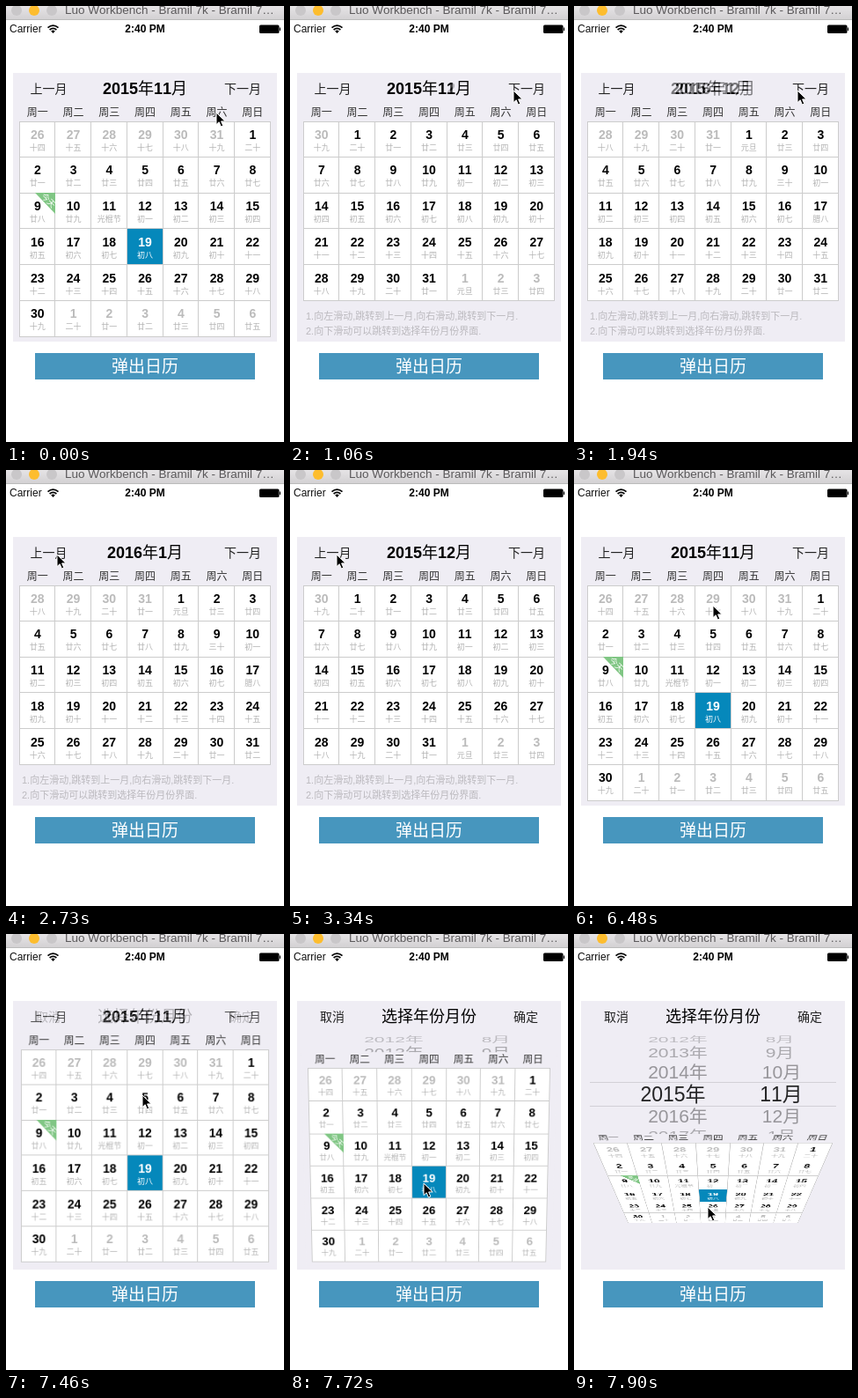
Recreate the animation shown at these times as an HTML page. Size 316 px wide and 495 px high, loop 7990 ms.

```html
<!DOCTYPE html>
<html lang="zh-CN">
<head>
<meta charset="utf-8">
<title>Calendar</title>
<style>
html, body { margin: 0; width: 100%; height: 100%; overflow: hidden; background: #fff; }
body { font-family: "Liberation Sans", "Noto Sans CJK SC", "Noto Sans CJK", sans-serif; font-kerning: none; }
#stage { position: relative; width: 316px; height: 495px; overflow: hidden; }
#stage div, #stage svg { position: absolute; }
.text { width: 260px; height: 20px; line-height: 20px; text-align: center; white-space: pre; z-index: 2; }
.left { text-align: left; }
.medium { font-weight: 500; }
.bold { font-weight: 700; }
.cell { box-sizing: border-box; border: 1px solid #ccc; background: #fff; }
.selected { background: #0588bb; }
.ribbon { background: #80c684; clip-path: polygon(0 0, 100% 0, 100% 100%); z-index: 1; }
#bar { width: 316px; height: 15px; background: linear-gradient(#e6e4e6, #d3d1d3); border-bottom: 1px solid #bbb; }
.light { width: 12px; height: 12px; top: -1px; border-radius: 50%; background: #c9c7c9; }
#panel { left: 8px; top: 76px; width: 300px; height: 305px; background: #efedf4; }
#picker, #pane, #heads { left: 0; top: 0; width: 316px; isolation: isolate; }
#heads, #heads > div { height: 112px; }
#heads > div { width: 316px; mix-blend-mode: plus-lighter; }
#pane { height: 381px; transform-origin: 0 0; }
#cover { left: 8px; top: 112px; width: 300px; height: 269px; background: #efedf4; }
.rule { left: 18px; width: 280px; height: 1px; background: #d2d0d6; }
#button { left: 33px; top: 394px; width: 250px; height: 30px; background: #4796be; }
#cursor { left: 0; top: 0; z-index: 5; }
</style>
</head>
<body>
<div id="stage">
  <div id="bar">
    <div class="light" style="left:6px"></div>
    <div class="light" style="left:26px;background:#fdbd2e"></div>
    <div class="light" style="left:46px"></div>
  </div>
  <svg width="316" height="40" fill="none" stroke="#000">
    <path d="M47.5 24.6Q53.5 19.6 59.5 24.6M49.6 27Q53.5 23.6 57.4 27" stroke-width="1.7"/>
    <path d="M51.2 28.6Q53.5 26.6 55.8 28.6L53.5 31Z" fill="#000" stroke="none"/>
    <rect x="288" y="21.5" width="22.5" height="9.5" rx="1.5" fill="#000" stroke="none"/>
    <path d="M311.5 24.5V28"/>
  </svg>
  <div id="panel"></div>
  <div id="picker">
    <div class="rule" style="top:168px"></div>
    <div class="rule" style="top:195px"></div>
  </div>
  <div id="pane"><div id="cover"></div></div>
  <div id="heads"></div>
  <div id="button"></div>
  <svg id="cursor" width="14" height="19">
    <path d="M1 1V14.6L4.2 11.7L6.4 17L8.8 16L6.6 10.9H11.2Z" stroke="#fff"/>
  </svg>
</div>
<script>
const $ = id => document.getElementById(id);
const stage = $('stage'), pane = $('pane'), heads = $('heads'), cursor = $('cursor');
const LOOP = 7990;

function box(parent, className, left = 0, top = 0, width, height) {
  const el = document.createElement('div');
  el.className = className;
  el.style.cssText = `left:${left}px;top:${top}px;` + (width ? `width:${width}px;height:${height}px` : '');
  return parent.appendChild(el);
}

// Centred on (x, y); with class "left", x is the left edge.
function text(parent, content, x, y, size, color, className = '') {
  const el = box(parent, 'text ' + className, className.includes('left') ? x : x - 130, y - 10);
  el.style.fontSize = size + 'px';
  el.style.color = color;
  el.innerHTML = content;
  return el;
}

// Window title, status bar and button
text(stage, 'Luo Workbench - Bramil 7k - Bramil 7…', 67, 5, 13.5, '#5a585a', 'left');
text(stage, 'Carrier', 4, 26, 12, '#111', 'left');
text(stage, '2:40 PM', 158, 26, 12, '#000', 'bold');
text(stage, '弹出日历', 158, 410, 19, '#fff', 'medium');

// Calendar
const PITCH = 40.75, CELL = 42;   // each cell overlaps its left and upper neighbours' borders
const centerX = col => 15.5 + PITCH * (col + 0.5);
const DIGITS = '一二三四五六七八九十';
const FESTIVALS = { '11-11': '光棍节', '1-1': '元旦', '1-17': '腊八' };
const NEW_MOONS = [-13, 17, 46, 76];   // in days after 26 October 2015

function lunarName(day) {
  const n = day - NEW_MOONS.filter(start => start <= day).pop();
  if (n === 19) return '二十';
  if (n === 29) return '三十';
  return '初十廿'[Math.floor(n / 10)] + DIGITS[n % 10];
}

function buildMonth(month, firstDay, rows) {
  const grid = box(pane, 'month');
  for (let i = 0; i < rows * 7; i++) {
    const col = i % 7, row = Math.floor(i / 7);
    const date = new Date(2015, 9, 26 + firstDay + i);
    const key = `${date.getMonth() + 1}-${date.getDate()}`;
    const selected = key === '11-19', inMonth = date.getMonth() + 1 === month;
    const x = Math.floor(15 + PITCH * col), y = Math.floor(131 + 40.66 * row);
    const textY = Math.floor(146 + PITCH * row);
    box(grid, 'cell' + (selected ? ' selected' : ''), x, y, CELL, CELL);
    text(grid, date.getDate(), centerX(col), textY, 14, selected ? '#fff' : inMonth ? '#000' : '#bbb', 'bold');
    text(grid, FESTIVALS[key] || lunarName(firstDay + i), centerX(col), textY + 14.5, 9, selected ? '#fff' : '#b2b2b2');
    if (key === '11-9') {
      box(grid, 'ribbon', x + 18, y, 23, 24);
      text(grid, '今天', x + 32.5, y + 9, 9.5, '#fff').style.transform = 'rotate(45deg)';
    }
  }
  if (rows < 6) {
    text(grid, '1.向左滑动,跳转到上一月,向右滑动,跳转到下一月.', 18, 352, 11, '#bbb9be', 'left');
    text(grid, '2.向下滑动可以跳转到选择年份月份界面.', 18, 369, 11, '#bbb9be', 'left');
  }
  return grid;
}

function buildHead(title, left, leftX, right, rightX) {
  const head = box(heads, '');
  text(head, title.replace(/\d+/g, '<b>$&</b>'), 158, 94, 18, '#000', 'medium');
  text(head, left, leftX, 94, 14, '#222');
  text(head, right, rightX, 94, 14, '#222');
  return head;
}

const monthHead = title => buildHead(title, '上一月', 48.5, '下一月', 269);
[...'一二三四五六日'].forEach((d, col) => text(pane, '周' + d, centerX(col), 121, 12, '#333'));

const november = { grid: buildMonth(11, 0, 6), head: monthHead('2015年11月') };
const december = { grid: buildMonth(12, 35, 5), head: monthHead('2015年12月') };
const january = { grid: buildMonth(1, 63, 5), head: monthHead('2016年1月') };
const chooser = { grid: november.grid, head: buildHead('选择年份月份', '取消', 48, '确定', 268) };
const views = [november, december, january, chooser];

// Picker wheels: rows on a cylinder seen from the front
for (let k = -3; k <= 3; k++) {
  const angle = 0.38 * k, chosen = k === 0;
  const color = `rgba(0,0,0,${chosen ? 0.85 : 0.45 - 0.08 * Math.abs(k)})`;
  const wheel = (label, x) => {
    text($('picker'), label, x, 182 + 68 * Math.sin(angle), chosen ? 23 : 21, color)
      .style.transform = `scaleY(${Math.cos(angle)})`;
  };
  wheel(2015 + k + '年', chosen ? 112.5 : 117.5);
  wheel((11 + k - 1) % 12 + 1 + '月', k < -1 ? 233.5 : 235.5);
}

// [time, view shown from then on]
const changes = [[-1000, november], [1060, december], [1850, january], [2990, december], [3880, november], [7460, chooser]];
// [first step, last step, steps, x, y]
const moves = [
  [90, 610, 7, 253, 95], [2200, 2640, 6, 59, 96], [2730, 2730, 1, 57, 95],
  [3340, 3340, 1, 52, 95], [4500, 4500, 1, 54, 98], [4770, 4770, 1, 68, 109],
  [4860, 5040, 3, 168, 159], [5310, 5400, 2, 157, 156], [6480, 6480, 1, 157, 153],
  [6930, 6930, 1, 156, 150], [7020, 7280, 4, 154, 163],
  [7460, 7720, 4, 151, 282], [7810, 7900, 2, 151, 309]
];

// Progress in equal hard steps, the first at "from" and the last at "to"
function stepped(t, from, to, count) {
  if (t < from) return 0;
  if (t >= to) return 1;
  return (1 + Math.floor((t - from) / (to - from) * (count - 1) + 0.1)) / count;
}

function showView(t) {
  const index = changes.filter(([time]) => time <= t).length - 1;
  const [start, view] = changes[index];
  const previous = index ? changes[index - 1][1] : view;
  const p = stepped(t, start, start + 260, 4);
  for (const v of views) {
    v.grid.style.display = v.grid === view.grid ? '' : 'none';
    v.head.style.opacity = v === view ? p : v === previous ? 1 - p : 0;
  }
}

function tiltPane(t) {
  const u = stepped(t, 7460, 7900, 6);
  if (!u) return void (pane.style.transform = 'none');
  // Depth w grows down the pane from the grid's top edge (y = 131).
  const depth = 1 + 0.048 * u ** 0.7, slope = 0.00176 * u ** 6;
  const top = (131 + 106 * u ** 4) * depth, squash = 1 - 0.033 * u ** 3;
  const w = depth - 131 * slope;
  pane.style.transform = `matrix3d(1,0,0,0, ${158 * slope},${squash},0,${slope}, 0,0,1,0, ` +
    `${158 * (w - 1)},${top - 131 * squash},0,${w})`;
}

function moveCursor(t) {
  let x = 238, y = 120;
  for (const [from, to, count, toX, toY] of moves) {
    const p = stepped(t, from, to, count), eased = p * p * (3 - 2 * p);
    x += (toX - x) * eased;
    y += (toY - y) * eased;
  }
  cursor.style.transform = `translate(${Math.round(x)}px,${Math.round(y)}px)`;
}

function draw(now) {
  const t = now % LOOP;
  showView(t);
  tiltPane(t);
  moveCursor(t);
  requestAnimationFrame(draw);
}
draw(0);
</script>
</body>
</html>
```
